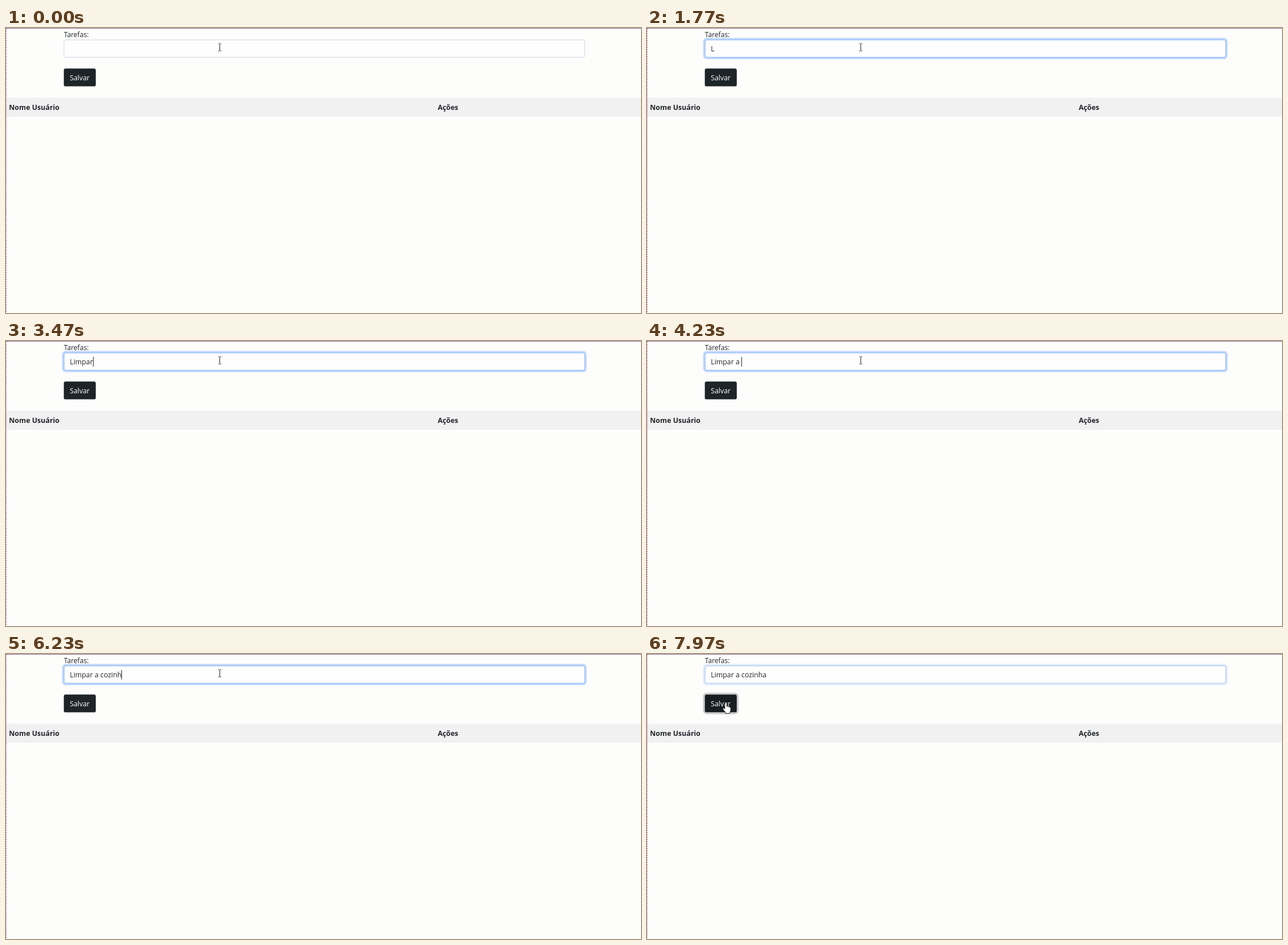
Animation, 1117 px wide and 501 px high, one loop 8 s. Source, as an HTML page:

```html
<!DOCTYPE html>
<html lang="pt">
<head>
<meta charset="utf-8">
<title>Tarefas</title>
<style>
  html, body { margin: 0; width: 100%; height: 100%; overflow: hidden; background: #fdfdfc; }
  svg { display: block; }
  text { font: 12.35px "Open Sans", "Noto Sans", sans-serif; fill: #212529; white-space: pre; }
  .bold { font-weight: 700; font-size: 12.4px; }
  #label { font-size: 12.1px; }
  #caption { fill: #fff; }
</style>
</head>
<body>
<svg width="1117" height="501" viewBox="0 0 1117 501">
  <rect width="1117" height="501" fill="#fdfdfc"/>
  <rect y="122.5" width="1117" height="33.5" fill="#f1f1f2"/>
  <path d="M0 .5H1117" stroke="#8a6a90"/>
  <path d="M.5 1V501" stroke="#c0679f" stroke-dasharray="2 2"/>

  <text id="label" x="101.7" y="16">Tarefas:</text>
  <rect id="halo" x="100.3" y="19.1" width="919.4" height="34.1" rx="4.6" fill="none" stroke="#0d6efd" stroke-width="3.3"/>
  <rect x="102.1" y="20.9" width="916" height="30.5" rx="3" fill="#fefefe" stroke="#d2d5e0"/>
  <rect id="ring" x="102.1" y="20.9" width="916" height="30.5" rx="3" fill="none" stroke="#86b7fe"/>
  <text id="typed" x="112.3" y="41"></text>
  <rect id="caret" y="28" width="1" height="17" fill="#212529"/>

  <rect id="buttonHalo" x="100" y="69.6" width="59.6" height="34.7" rx="4.6" fill="none" stroke="#42464a" stroke-width="3.3"/>
  <rect id="button" x="101.7" y="71.3" width="56.2" height="31.3" rx="3.2" fill="#1e2529"/>
  <text id="caption" x="112.2" y="92">Salvar</text>

  <text class="bold" x="5.3" y="144">Nome Usuário</text>
  <text class="bold" x="759.4" y="144">Ações</text>

  <g id="pointer">
    <path id="beam" d="M-2.5 -6.5H-.7M.7 -6.5H2.5M0 -6V6M-2.5 6.5H-.7M.7 6.5H2.5" fill="none" stroke="#222" stroke-width="1.1"/>
    <path id="arrow" d="M0 0V16L3.7 12.5L6.3 18L8.6 17L6.2 11.6H11.3Z" fill="#fff" stroke="#111" stroke-width=".9"/>
    <path id="hand" d="M-1.6 1.2Q-1.5 -.4 0 -.4Q1.5 -.4 1.6 1.2V6Q3.4 5 4.2 6.6Q6 5.8 6.7 7.3Q8.7 6.8 8.8 9V12.2Q8.8 14.6 7.3 16V18.4H-.4V16.8L-4.6 11.6Q-5.6 9.7 -4 9.1Q-2.8 8.9 -1.6 10.5Z" fill="#fff" stroke="#111" stroke-width=".9"/>
  </g>
</svg>
<script>
const LOOP = 8000, BLINK = 530, FADE = 150;
const FOCUS = 200, BLUR = 7895;
const MOVE = { start: 6900, end: 7700, from: [376, 34], to: [138.5, 86] };
const PHRASE = "Limpar a cozinha";
const keyTimes = [1050, 2050, 2320, 2600, 2880, 3150, 3550, 3900, 4200, 4500, 4780, 5150, 5450, 5750, 6050, 6380];

const el = id => document.getElementById(id);
const clamp = v => Math.min(1, Math.max(0, v));
const smooth = v => v * v * (3 - 2 * v);
const ramp = (t, start, length) => smooth(clamp((t - start) / length));
const show = (id, on) => el(id).setAttribute("visibility", on ? "visible" : "hidden");

function drawField(t) {
  const focus = ramp(t, FOCUS, FADE) - ramp(t, BLUR, FADE);
  el("halo").setAttribute("opacity", .25 * focus);
  el("ring").setAttribute("opacity", focus);

  const count = keyTimes.filter(k => k <= t).length;
  const typed = el("typed");
  typed.textContent = PHRASE.slice(0, count);
  const width = count ? typed.getComputedTextLength() : 0;
  el("caret").setAttribute("x", Math.round(112.3 + width));

  const lastInput = count ? keyTimes[count - 1] : FOCUS;
  show("caret", t >= FOCUS && t < BLUR && (t - lastInput) % (2 * BLINK) < BLINK);
}

function drawPointer(t) {
  const p = ramp(t, MOVE.start, MOVE.end - MOVE.start);
  const [x, y] = MOVE.from.map((a, i) => a + (MOVE.to[i] - a) * p);
  const overField = y < 52;
  const overButton = x < 158 && y > 71;
  el("pointer").setAttribute("transform", `translate(${x} ${y})`);
  show("beam", overField);
  show("arrow", !overField && !overButton);
  show("hand", overButton);
  el("button").setAttribute("fill", overButton ? "#181d21" : "#1e2529");
  el("buttonHalo").setAttribute("opacity", .5 * ramp(t, BLUR, FADE));
}

const began = performance.now();
function render() {
  const t = (performance.now() - began) % LOOP;
  drawField(t);
  drawPointer(t);
  requestAnimationFrame(render);
}
render();
</script>
</body>
</html>
```
